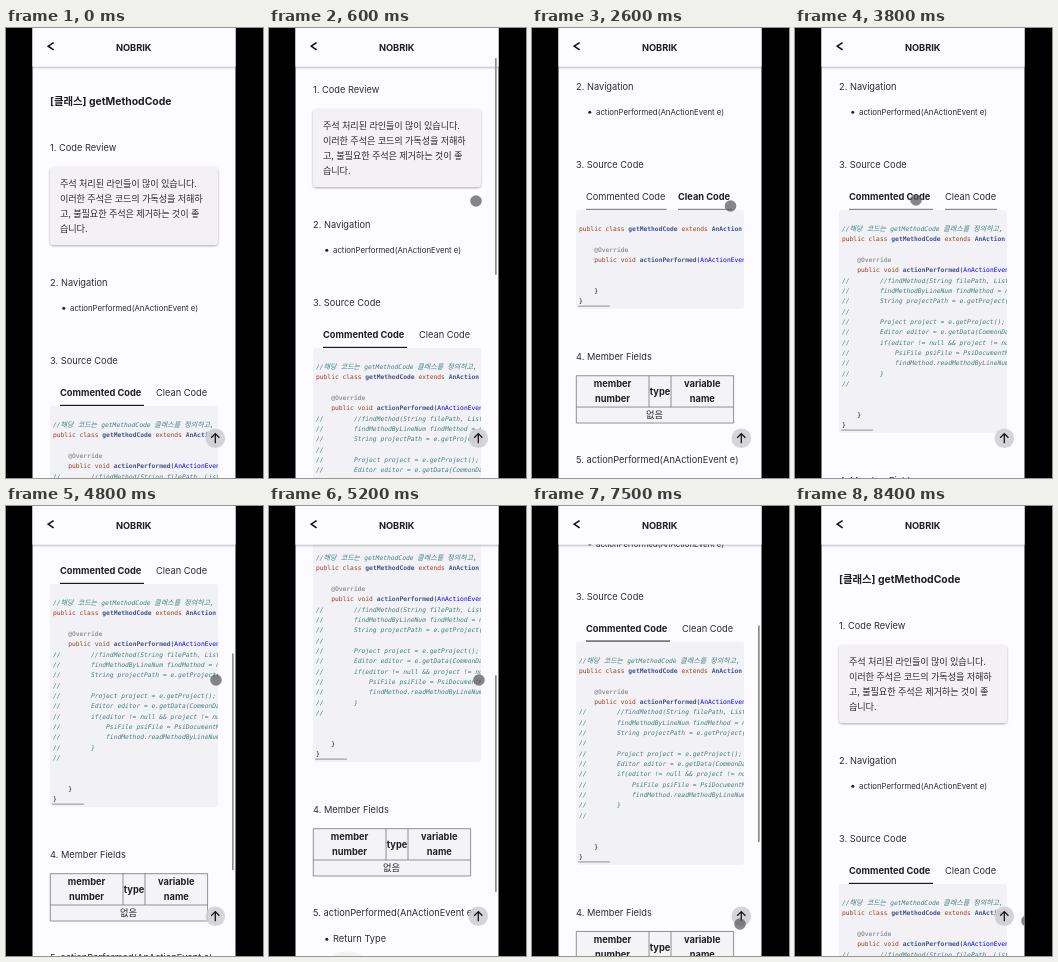
Write an HTML page that moves like this. It is 257 by 450 pixels and loops after 8.6 s.

```html
<!DOCTYPE html>
<html lang="ko">
<head>
<meta charset="utf-8">
<title>Code review</title>
<style>
  html, body { margin: 0; width: 100%; height: 100%; overflow: hidden; background: #000; }
  svg { display: block; width: 100vw; height: 100vh; }
  text { font: 9.25px Inter, "Noto Sans CJK KR", "Noto Sans CJK", sans-serif; fill: #2d2c30; white-space: pre; }
  .bold { font-weight: 700; fill: #1f1e22; }
  .mid { text-anchor: middle; }
  .small { font-size: 7.8px; }
  .title { font-size: 10.4px; }
  .body { font-size: 9.2px; letter-spacing: -.15px; }
  .code text { font: 6.3px "DejaVu Sans Mono", "Noto Sans CJK KR", "Noto Sans CJK", monospace; fill: #111; }
  .code .kw { fill: #954121; }
  .code .name { fill: #445588; font-weight: 700; }
  .code .par { fill: #00f; }
  .code .meta { fill: #999; font-weight: 700; }
  .code .com { fill: #408080; font-style: italic; }
  .code .ko { font-size: 7px; }
</style>
</head>
<body>
<svg viewBox="0 0 257 450" preserveAspectRatio="none">
  <defs>
    <clipPath id="screen"><rect x="26.5" width="203" height="450"/></clipPath>
    <clipPath id="codeClip"><rect x="44" y="378" width="168" height="223"/></clipPath>
    <filter id="soft" x="-20%" y="-20%" width="140%" height="150%">
      <feDropShadow dx="0" dy="1" stdDeviation=".9" flood-color="#000" flood-opacity=".32"/>
    </filter>
  </defs>
  <g clip-path="url(#screen)">
    <rect x="26" width="204" height="450" fill="#fcfbff"/>
    <g id="page">
      <g id="upper"></g>
      <g id="tabs"></g>
      <rect id="codeBox" x="44" y="378" width="168" rx="3" fill="#f2f1f5"/>
      <g class="code" clip-path="url(#codeClip)">
        <g id="full"></g>
        <g id="clean"></g>
      </g>
      <rect id="codeBar" x="46" width="32" height="1.3" rx=".6" fill="#a3a2a6"/>
      <g id="lower"></g>
    </g>
    <g id="top">
      <rect x="20" y="-5" width="217" height="43.5" fill="#fcfbff" filter="url(#soft)"/>
      <path d="M47.6 14.6L42.2 18.2L47.6 21.8" fill="none" stroke="#111" stroke-width="1.6"/>
      <text class="bold mid" x="127.7" y="22.7">NOBRIK</text>
    </g>
    <circle cx="209.3" cy="410.3" r="9.8" fill="#cfced2" fill-opacity=".88"/>
    <path d="M209.3 415.2V405.8M205.2 409.8L209.3 405.6L213.4 409.8" fill="none" stroke="#151515" stroke-width="1.3"/>
    <rect id="bar" x="226" width="1.7" height="217" rx=".8" fill="#8d8c91"/>
    <circle id="dot" r="5.8" fill="#59585c" fill-opacity=".72"/>
  </g>
</svg>
<script>
const $ = id => document.getElementById(id);
const LOOP = 8600, STEP = 100, PITCH = 10.33;
const CODE_TOP = 378, FULL_H = 223, CLEAN_H = FULL_H - 12 * PITCH;

const esc = s => s.replace(/&/g, '&amp;').replace(/</g, '&lt;');
const text = (x, cy, s, cls = '') => `<text class="${cls}" x="${x}" y="${cy + 3.3}">${esc(s)}</text>`;
const bullet = cy => `<circle cx="57.8" cy="${cy + .3}" r="1.5" fill="#222"/>`;
const mid = (x, cy, s) => text(x, cy, s, 'mid');
const head = (x, cy, s) => text(x, cy, s, 'bold mid');

// xs: column edges, ys: row edges; the first row is the header
function grid(xs, ys) {
  const [l, r] = [xs[0], xs[xs.length - 1]];
  const [t, m, b] = ys;
  return `<rect x="${l}" y="${t}" width="${r - l}" height="${b - t}" fill="#f4f3f6"/>` +
    `<path d="M${l} ${t}H${r}V${b}H${l}ZM${l} ${m}H${r}` +
    xs.slice(1, -1).map(x => `M${x} ${t}V${xs.length > 3 && l > 50 ? b : m}`).join('') +
    `" fill="none" stroke="#77767a" stroke-width=".8"/>`;
}

$('upper').innerHTML =
  text(44, 73.5, '[클래스] getMethodCode', 'bold title') +
  text(44, 120, '1. Code Review') +
  '<rect x="44" y="139" width="168" height="78" rx="4" fill="#f3f1f4" filter="url(#soft)"/>' +
  ['주석 처리된 라인들이 많이 있습니다.', '이러한 주석은 코드의 가독성을 저해하', '고, 불필요한 주석은 제거하는 것이 좋', '습니다.']
    .map((s, i) => text(54, 156 + i * 15, s, 'body')).join('') +
  text(44, 254.5, '2. Navigation') +
  bullet(280) + text(64, 279.6, 'actionPerformed(AnActionEvent e)', 'small') +
  text(44, 333, '3. Source Code');

$('tabs').innerHTML =
  text(54, 364.5, 'Commented Code') + '<rect x="54" y="376.8" width="84" height="1.2" fill="#1b1a1e"/>' +
  '<g>' + text(150, 364.5, 'Clean Code') + '<rect x="150" y="376.8" width="52" height="1.2" fill="#1b1a1e"/></g>';
const [tabA, lineA, groupB] = $('tabs').children;
const [tabB, lineB] = groupB.children;

$('lower').innerHTML =
  text(44, 649, '4. Member Fields') +
  grid([44.3, 117, 139, 201.6], [667.7, 699, 715]) +
  head(80.5, 676, 'member') + head(80.5, 691, 'number') + head(128, 683.5, 'type') +
  head(170.3, 676, 'variable') + head(170.3, 691, 'name') + mid(122.5, 707, '없음') +
  text(44, 752, '5. actionPerformed(AnActionEvent e)') +
  bullet(778) + text(64, 778, 'Return Type') +
  '<rect x="64" y="791.5" width="28.5" height="19.5" rx="8" fill="#f3f1f4" filter="url(#soft)"/>' +
  mid(78.2, 801, 'void') +
  bullet(828) + text(64, 828, 'Parameter Type') +
  grid([64.3, 104, 170, 211.6], [840.5, 872, 887]) +
  head(84.2, 848.5, 'param') + head(84.2, 863.5, 'number') + head(137, 856, 'type') +
  head(191, 848.5, 'variable') + head(191, 863.5, 'name') +
  mid(84.2, 879.5, '1') + mid(137, 879.5, 'AnActionEvent') + mid(191, 879.5, 'e');

const com = s => [['com', s]];
const classLine = [['kw', 'public class '], ['name', 'getMethodCode '], ['kw', 'extends '], ['name', 'AnAction'], ['', ' {']];
const override = [['meta', '    @Override']];
const method = [['kw', '    public void '], ['name', 'actionPerformed'], ['', '('], ['par', 'AnActionEvent e'], ['', ') {']];
const tail = [[], [], [['', '    }']], [['', '}']]];
const intro = [['com', '//'], ['com ko', '해당 코드는 '], ['com', 'getMethodCode '], ['com ko', '클래스를 정의하고, '], ['com', '...']];
const hidden = [
  '        //findMethod(String filePath, List',
  '        findMethodByLineNum findMethod = new',
  '        String projectPath = e.getProject()',
  '',
  '        Project project = e.getProject();',
  '        Editor editor = e.getData(CommonDataKeys',
  '        if(editor != null && project != null',
  '            PsiFile psiFile = PsiDocumentManager',
  '            findMethod.readMethodByLineNum',
  '        }',
  ''
].map(s => com('//' + s));

const listing = lines => lines.map((parts, i) =>
  `<text x="47" y="${397 + i * PITCH + 2.1}">` +
  parts.map(([cls, s]) => `<tspan class="${cls}">${esc(s)}</tspan>`).join('') + '</text>').join('');
$('full').innerHTML = listing([intro, classLine, [], override, method, ...hidden, ...tail]);
$('clean').innerHTML = listing([classLine, [], override, method, ...tail]);

// Each row: time, then the values reached at that time
const scrollKeys = [[400, 0], [500, 12], [600, 58], [700, 104], [800, 130], [900, 141], [1100, 141], [1200, 148],
  [1300, 164], [1500, 186], [1700, 194], [2000, 196], [4500, 196], [4600, 214], [4800, 300], [4900, 328],
  [5000, 340], [5100, 345], [5400, 345], [5500, 366], [5600, 410], [5700, 445], [5800, 461], [5900, 467]];
const barKeys = [[400, 0], [500, 1], [1700, 1], [2000, 0], [4400, 0], [4500, 1], [6000, 1], [6300, 0],
  [7100, 0], [7200, 1], [8200, 1], [8400, 0]];
const dotKeys = [[500, 207, 173], [1600, 207, 173], [2000, 198.5, 178], [3200, 198.5, 178], [3300, 190, 185.5],
  [3400, 150, 180], [3500, 121, 172], [4200, 121, 172], [4400, 180, 178], [4500, 223, 176], [4700, 210, 174],
  [6400, 210, 174], [6500, 223, 235], [6600, 208, 332], [6700, 213, 385], [6800, 212, 411], [7000, 208, 418],
  [7800, 208, 418], [8000, 228, 415.5], [8100, 232, 415]];
const tabKeys = [[2500, 0], [2600, .5], [2700, 1], [3700, 1], [3800, .5], [3900, .2], [4000, 0]];

function at(keys, t) {
  const n = keys.findIndex(k => k[0] > t);
  if (n === 0) return keys[0].slice(1);
  if (n < 0) return keys[keys.length - 1].slice(1);
  const a = keys[n - 1], b = keys[n], p = (t - a[0]) / (b[0] - a[0]);
  return a.slice(1).map((v, i) => v + (b[i + 1] - v) * p);
}

function scrollAt(t) {
  if (t < 7110) return at(scrollKeys, t)[0];
  const p = Math.min(1, (t - 7110) / 800);
  return 467 * (1 - p * p * (3 - 2 * p));
}

function draw(now) {
  const t = Math.floor(now % LOOP / STEP) * STEP;
  const y = scrollAt(t);
  const isClean = t >= 2600 && t < 3800;
  const height = isClean ? CLEAN_H : FULL_H;
  const [mix] = at(tabKeys, t);
  const [x, dy] = at(dotKeys, t);

  $('page').setAttribute('transform', `translate(0 ${-y})`);
  $('codeBox').setAttribute('height', height);
  $('codeBar').setAttribute('y', CODE_TOP + height - 3.5);
  $('lower').setAttribute('transform', `translate(0 ${height - FULL_H})`);
  $('full').style.display = isClean ? 'none' : '';
  $('clean').style.display = isClean ? '' : 'none';

  tabA.setAttribute('class', isClean ? '' : 'bold');
  tabB.setAttribute('class', isClean ? 'bold' : '');
  groupB.setAttribute('transform', `translate(${isClean ? -4 : 0} 0)`);
  lineA.setAttribute('width', isClean ? 80.5 : 84);
  lineB.setAttribute('width', isClean ? 54 : 52);
  lineA.style.opacity = 1 - mix;
  lineB.style.opacity = mix;

  $('bar').setAttribute('y', 2 + y * .484);
  $('bar').style.opacity = at(barKeys, t)[0];
  $('dot').setAttribute('cx', x);
  $('dot').setAttribute('cy', dy);
  $('dot').style.display = t < 500 ? 'none' : '';
}

const start = performance.now();
function tick() {
  draw(performance.now() - start);
  requestAnimationFrame(tick);
}
tick();
</script>
</body>
</html>
```
